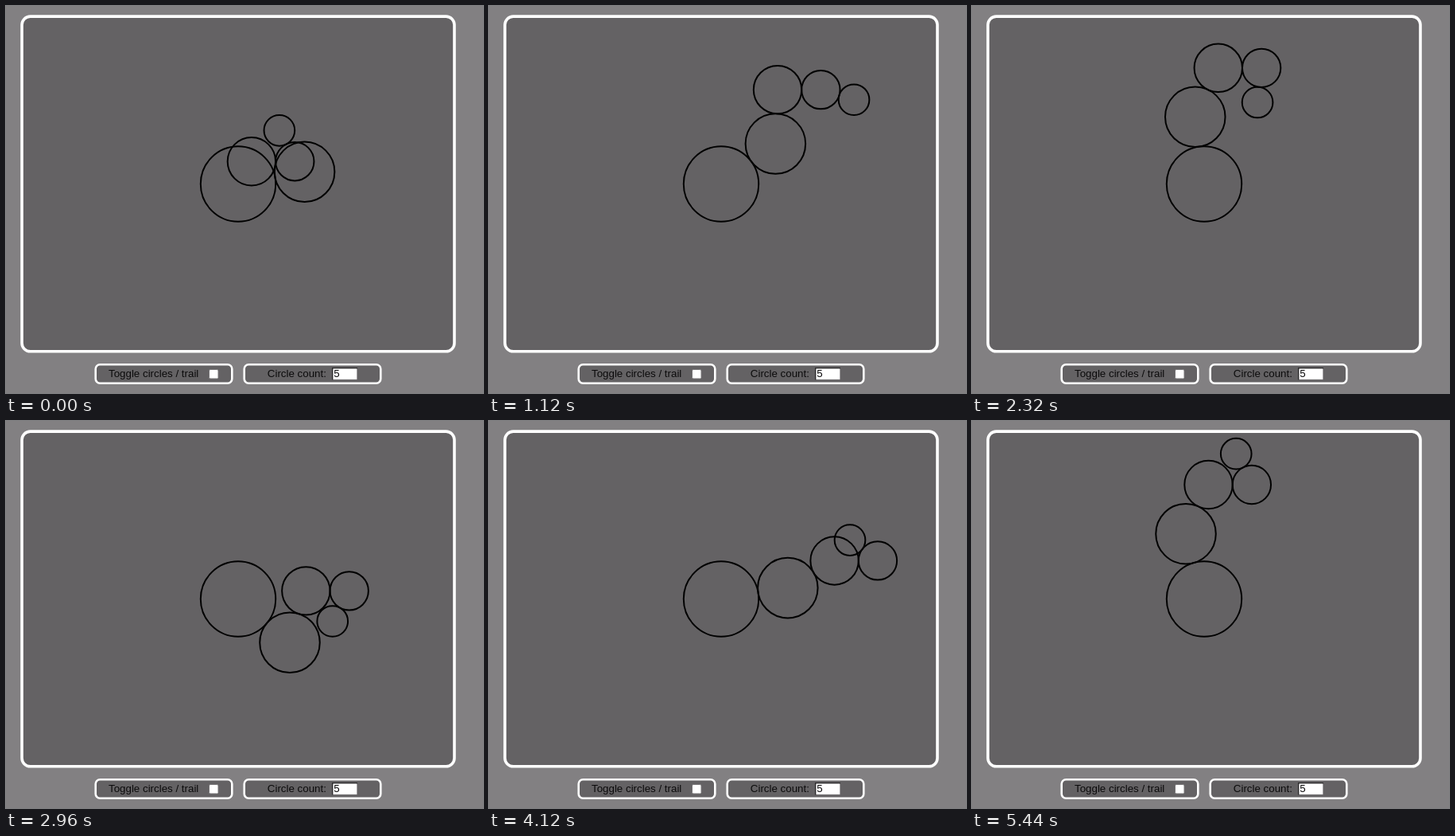
Animation of 600x486 px, one loop 5480 ms. Source, as an HTML page:

```html
<!DOCTYPE html>
<html lang="en">
<head>
<meta charset="utf-8">
<title>Rolling circles</title>
<style>
  html, body { margin: 0; width: 100%; height: 100%; overflow: hidden; background: #828082; }
  svg { display: block; width: 600px; height: 486px; }
  text { font: 13.333px "Liberation Sans", Arial, sans-serif; fill: #0c0b0c; }
  .box { fill: #646264; stroke: #fff; }
  #chain { fill: none; stroke: #000; stroke-width: 2; }
</style>
</head>
<body>
<svg viewBox="0 0 600 486">
  <rect class="box" x="20" y="13.1" width="544" height="420.7" rx="10.5" stroke-width="3.6"/>
  <g id="chain"></g>

  <rect class="box" x="112.7" y="450.2" width="171.6" height="23.6" rx="5.5" stroke-width="2.6"/>
  <text x="129" y="466">Toggle circles / trail</text>
  <rect x="255.5" y="456.5" width="11.5" height="11.5" rx="1.5" fill="#fff" stroke="#777577"/>

  <rect class="box" x="299.7" y="450.2" width="171.6" height="23.6" rx="5.5" stroke-width="2.6"/>
  <text x="328.8" y="466">Circle count:</text>
  <rect x="410" y="454" width="32" height="15.5" rx="1" fill="#8a888a"/>
  <path d="M410 469.5V454H442V455.5H411.5V469.5Z" fill="#2c2b2c"/>
  <rect x="411.5" y="455.5" width="29.7" height="13.3" fill="#fff"/>
  <text x="412.3" y="466">5</text>
</svg>
<script>
const LOOP = 5480, FRAME = 40;
const RADIUS = 47.2, SHRINK = 0.8;
// Direction of each link in degrees, and its turn per step
const links = [
  { start: -10.3, turn: -11.7 },
  { start: -168.9, turn: -19.36 },
  { start: 0, turn: 0 },
  { start: -116.5, turn: -17.78 }
];

const chain = document.getElementById("chain");
const circles = Array.from({ length: links.length + 1 }, (_, i) => {
  const c = document.createElementNS("http://www.w3.org/2000/svg", "circle");
  c.setAttribute("r", RADIUS * SHRINK ** i);
  return chain.appendChild(c);
});

function place(circle, x, y) {
  circle.setAttribute("cx", x);
  circle.setAttribute("cy", y);
}

function draw(ms) {
  // The chain steps 30 times a second but is shown at 25
  const frame = Math.floor(ms / FRAME);
  const step = Math.max(0, Math.floor(1.2 * frame - 0.5));
  let x = 292, y = 223.5, r = RADIUS;
  place(circles[0], x, y);
  links.forEach(({ start, turn }, i) => {
    const angle = (start + turn * step) * Math.PI / 180;
    const reach = r + r * SHRINK;
    x += reach * Math.cos(angle);
    y += reach * Math.sin(angle);
    r *= SHRINK;
    place(circles[i + 1], x, y);
  });
}

const begin = performance.now();
function tick() {
  draw((performance.now() - begin) % LOOP);
  requestAnimationFrame(tick);
}
tick();
</script>
</body>
</html>
```
